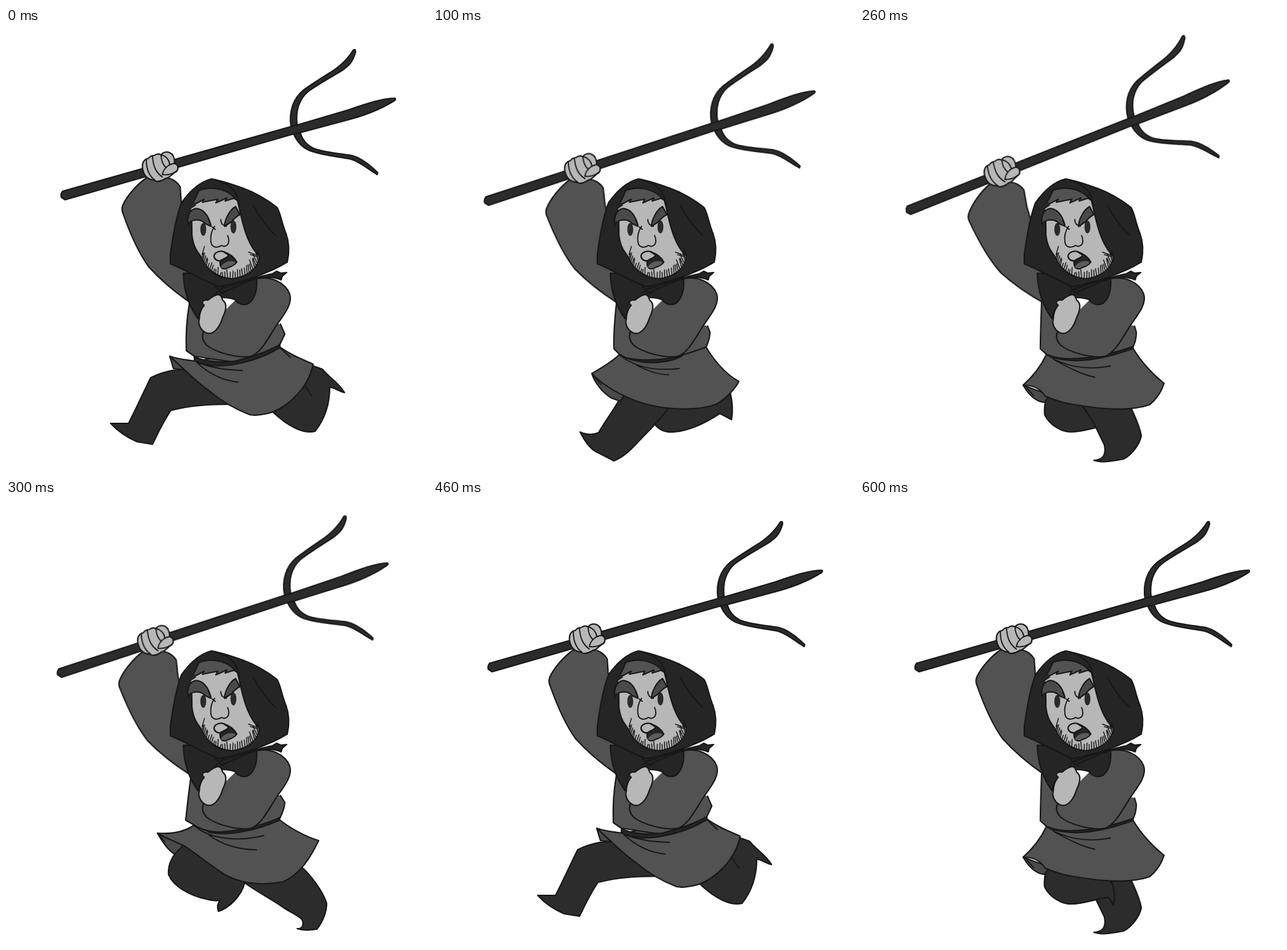
Write an HTML page that moves like this. It is 684 px wide and 721 px high and loops after 700 ms.

```html
<!DOCTYPE html>
<html lang="en">
<head>
<meta charset="utf-8">
<title>Running peasant</title>
<style>
  html, body { margin: 0; width: 100%; height: 100%; overflow: hidden; background: #fff; }
  svg { display: block; width: 100vw; height: 100vh; }
  path { stroke: #171717; stroke-width: 2.2; stroke-linejoin: round; stroke-linecap: round; }
  .iron { fill: #2b2b2b; }
  .leg { fill: #2c2c2c; }
  .cloth { fill: #525252; }
  .flap { fill: #4a4a4a; }
  .cape { fill: #252525; }
  .skin { fill: #b7b7b7; }
  .line { fill: none; stroke-width: 1.9; }
  .flat { stroke: none; }

  /* Drawn on sevens: every pose holds for 100 ms. */
  #arm, .pose, .over { animation: 700ms step-end infinite; }
  .pose, .over { opacity: 0; }
  #arm { transform-origin: 323px 425px; animation-name: swing; }
  #stride { animation-name: stride; }
  #pass { animation-name: pass; }
  #tuck { animation-name: tuck; }
  #push { animation-name: push; }
  #passOver { animation-name: passOver; }
  #tuckOver { animation-name: tuckOver; }

  @keyframes swing {
    0%, 57.14%, 85.71%, 100% { transform: rotate(0deg); }
    14.28%, 42.85%, 71.42% { transform: rotate(-2.23deg); }
    28.57% { transform: rotate(-5.8deg); }
  }
  @keyframes stride { 0%, 57.14% { opacity: 1; } 14.28%, 71.42%, 100% { opacity: 0; } }
  @keyframes pass { 0%, 28.57%, 85.71%, 100% { opacity: 0; } 14.28%, 71.42% { opacity: 1; } }
  @keyframes tuck { 0%, 42.85% { opacity: 0; } 28.57%, 85.71%, 100% { opacity: 1; } }
  @keyframes push { 0%, 57.14%, 100% { opacity: 0; } 42.85% { opacity: 1; } }
  @keyframes passOver { 0%, 85.71%, 100% { opacity: 0; } 71.42% { opacity: 1; } }
  @keyframes tuckOver { 0% { opacity: 0; } 85.71%, 100% { opacity: 1; } }
</style>
</head>
<body>
<svg viewBox="0 0 684 721">
  <g id="arm">
    <path class="cloth" d="M230 242C211 255 196 274 190 287Q187 294 190 301C202 335 215 365 232 388C250 408 275 429 298 445L330 440L292 322L285 286L283 258C277 248 267 243 258 243Z"/>
    <path class="iron" d="M463 160C459 134 468 113 483 101C497 91 508 84 524 74C544 62 556 49 564 36Q568 33 568 39C563 57 556 62 546 69C526 81 506 92 491 103C476 116 470 134 473 158Z"/>
    <path class="iron" d="M467 171C473 186 482 196 499 201C520 208 542 209 560 213C575 217 588 229 603 238L604 235C592 223 578 211 562 207C538 203 515 202 499 195C487 189 481 181 478 169Z"/>
    <path class="iron" d="M92 265L463 160L478 156L556 133C588 122 613 114 632 114Q634 116 631 118C609 132 585 141 560 148L478 170L464 173L96 279L90 275Q88 270 92 265Z"/>
    <path class="skin" d="M222 229C220 218 226 212 231 212Q235 207 241 207Q246 203 252 206C255 201 263 200 267 203C273 206 274 213 274 220C280 222 281 228 277 233C270 236 267 243 260 244C252 249 245 251 240 247C230 246 224 240 222 229Z"/>
    <path class="line" d="M228 214C228 229 232 240 242 247M238 208C239 224 243 234 254 242M252 206C252 216 255 222 260 227M253 206C260 208 265 214 266 221M254 238C256 227 266 220 275 220M254 238C261 239 270 237 276 233"/>
  </g>

  <g id="stride" class="pose">
    <path class="leg" d="M300 553L270 556C255 559 242 564 235 568C223 592 212 617 199 642L170 642C180 653 195 664 213 672L238 676C246 660 255 640 268 621C300 613 330 611 372 611L380 560Z"/>
    <path class="leg" d="M480 540L500 549L514 554C524 567 540 575 550 592C541 590 535 585 526 583C526 610 518 635 502 655C486 659 460 650 431 621L440 590Z"/>
    <path class="line" d="M484 578L497 598"/>
    <path class="flap" d="M266 533L272 553L290 555Z"/>
    <path class="cloth" d="M266 533C278 537 292 539 308 541L444 517C460 530 480 537 499 546C490 590 450 622 420 627Q406 630 396 628C375 620 350 606 330 589C305 572 285 549 266 533Z"/>
    <path class="cloth" d="M298 447C293 475 292 500 293 524L306 533L380 544L444 516L453 497L446 481"/>
    <path class="cape" d="M306 534C330 544 350 543 372 541C400 534 425 526 445 514L445 519C425 531 400 541 372 546C345 551 322 549 306 540Z"/>
    <path class="line" d="M310 543C335 552 362 556 384 556M311 544C328 560 350 572 377 575M446 520L462 535"/>
  </g>

  <g id="pass" class="pose">
    <path id="passBack" class="leg" d="M348 610C347 628 351 635 360 643C369 655 380 657 392 656C420 653 445 640 466 626L485 636C488 620 486 605 483 592Z"/>
    <path class="leg" d="M312 592L302 605C290 625 279 640 269 657C258 662 248 660 239 656C245 668 252 680 263 687L294 703C315 695 330 675 345 660C360 645 372 632 383 616Z"/>
    <use id="passOver" class="over" href="#passBack"/>
    <path class="flap" d="M258 561C262 575 275 592 290 601L304 606L314 592Z"/>
    <path class="cloth" d="M303 530C290 543 272 553 258 561C275 580 308 599 340 609C380 621 430 622 460 611C475 603 490 587 497 574C475 562 455 538 443 517Z"/>
    <path class="cloth" d="M298 447C295 475 293 500 294 521L303 530C330 548 375 544 444 518Q450 504 450 494L446 484"/>
    <path class="cape" d="M316 536C345 542 375 538 404 533C385 543 348 549 316 536Z"/>
    <path class="line" d="M303 531C330 552 360 557 400 553M330 547C350 558 366 563 383 563M261 565L273 579"/>
  </g>

  <g id="tuck" class="pose">
    <path id="tuckFront" class="leg" d="M306 592C300 605 299 615 300 628C308 645 328 656 342 656C362 656 382 648 403 645C406 648 409 652 411 658C416 645 413 630 407 616Z"/>
    <path class="leg" d="M357 607C366 622 378 635 384 650L397 677C400 692 396 701 380 702C393 707 410 703 428 700C442 693 455 675 457 662C454 645 447 632 440 616Z"/>
    <use id="tuckOver" class="over" href="#tuckFront"/>
    <path class="flap" d="M265 580C272 592 283 607 300 608L308 596Z"/>
    <path class="cloth" d="M303 530C295 547 284 563 265 580C285 580 295 588 301 598C315 604 328 608 345 611C400 621 440 622 470 612C482 603 490 590 494 577C475 562 455 540 443 519Z"/>
    <path class="cloth" d="M295 445C294 475 293 500 293 521L303 530C340 545 390 540 443 519Q449 508 449 494L446 484"/>
    <path class="cape" d="M314 535C350 541 400 533 444 517L442 521C410 533 355 548 314 535Z"/>
    <path class="line" d="M303 530C330 550 368 556 407 549M316 539C340 552 358 562 381 567M270 583L282 597"/>
  </g>

  <g id="push" class="pose">
    <path class="leg" d="M387 621C405 635 435 650 451 662C466 672 480 677 482 684C484 692 480 697 473 696C485 700 495 698 505 697C515 685 521 668 521 655C515 635 492 605 479 595Z"/>
    <path class="leg" d="M288 560C270 577 263 590 264 608C272 628 300 643 325 648Q340 652 348 650C343 656 343 661 345 668C361 663 382 645 388 621L350 598Z"/>
    <path class="flap" d="M246 541C255 557 265 570 274 575L288 561Z"/>
    <path class="cloth" d="M246 541C270 543 290 538 304 529L443 518C460 532 485 546 508 553C495 580 478 608 450 620C410 628 375 620 355 608C330 592 310 575 290 562C275 554 260 550 246 541Z"/>
    <path class="cloth" d="M300 452C297 475 294 500 292 520L306 528C335 548 395 540 445 517Q453 500 453 491L446 480"/>
    <path class="cape" d="M328 539C360 541 410 532 444 516L444 520C415 533 365 548 328 539Z"/>
    <path class="line" d="M306 529C330 550 375 556 419 545M330 544C350 560 380 568 407 568M249 544L258 555"/>
  </g>

  <path class="cloth" d="M408 407C432 402 455 415 461 432C466 448 452 465 440 482C427 502 415 527 398 533C378 537 340 527 326 515C319 508 318 500 321 493"/>
  <path class="cape" d="M288 398C289 428 297 452 312 472C314 462 320 450 340 440C350 436 362 438 372 441C378 450 390 452 397 445C405 437 409 425 407 404Z"/>
  <path class="cape" d="M346 425C375 416 405 404 433 399L440 395L446 398L456 397L449 403L447 409C436 404 425 404 411 406C393 410 370 422 349 431Z"/>
  <path class="cape" d="M334 245C314 250 299 264 285 284C276 308 270 345 267 368L267 383C292 393 318 409 346 420C375 415 425 400 457 380C461 362 459 345 455 334C447 314 446 299 440 291C422 277 404 267 385 260C368 254 352 248 334 245Z"/>
  <path class="line" d="M340 420L347 426L353 420M344 427L341 432M351 428L354 432M402 288C412 308 424 323 437 336M340 247C362 252 377 264 379 288"/>

  <path class="skin" d="M308 276L299 291C302 308 302 316 302 335C304 355 310 362 318 373C324 390 343 406 366 407C392 405 410 390 412 370C402 362 394 345 390 334C384 318 381 300 376 280L362 271Z"/>
  <path class="cloth" d="M313 264C330 257 356 259 372 276L356 281L359 276L341 284L344 278L319 283L322 278L307 286L299 291Q307 280 313 264Z"/>
  <path class="cape flat" d="M297 291L304 281L309 288L300 294Z"/>
  <path class="line" id="stubble" style="stroke-width:1.5"/>
  <ellipse cx="320.5" cy="327" rx="4.8" ry="10.5" fill="#2b2b2b"/>
  <ellipse cx="369.5" cy="323" rx="4.8" ry="10.5" fill="#2b2b2b"/>
  <path class="flap" d="M296 319C293 305 299 294 310 293C324 295 331 310 333 322L324 318C320 313 313 311 306 312Q299 313 296 319Z"/>
  <path class="flap" d="M355 322C355 313 362 296 373 290L380 303C374 306 370 310 366 315Z"/>
  <path class="line" d="M329 312L333 320M339 322C333 330 332 340 333 348C335 358 345 357 350 353C356 357 362 352 362 346Q362 341 360 337M335 323L340 327M349 311C349 318 353 321 358 322"/>
  <path class="cape" d="M338 371C338 366 345 361 353 363C365 367 372 374 375 380C371 387 362 388 357 391C350 392 347 387 348 379C343 378 339 376 338 371Z"/>
  <path class="skin" d="M338 371C338 366 345 361 353 363L362 369C359 374 353 374 348 378C343 378 339 376 338 371Z"/>
  <path class="flap flat" style="fill:#5c5c5c" d="M349 388C353 381 362 377 370 379L373 381C370 386 361 387 357 390Q352 391 349 388Z"/>

  <path class="skin" d="M322 450C316 447 320 440 328 442C333 438 339 434 344 433C351 433 350 440 353 443C360 448 357 460 352 470C346 490 335 499 325 495C315 490 312 480 314 473C314 462 318 455 322 450Z"/>
</svg>
<script>
  // Short bristles standing inward from the jaw's curve.
  const count = 32;
  const noise = n => Math.abs(Math.sin(n * 12.9898) * 43758.5453) % 1;
  let d = 'M394 364L405 368M397 368L408 371';
  for (let i = 0; i <= count; i++) {
    const a = (172 - i * 162 / count) * Math.PI / 180;
    const x = 365 + 47 * Math.cos(a), y = 362 + 44 * Math.sin(a);
    const size = 6 + 8 * noise(i + 1);
    const lean = -0.35 * Math.cos(a) + (noise(i + 50) - 0.5) * 0.3;
    d += `M${x.toFixed(1)} ${y.toFixed(1)}l${(lean * size).toFixed(1)} ${(-size).toFixed(1)}`;
  }
  document.getElementById('stubble').setAttribute('d', d);
</script>
</body>
</html>
```
